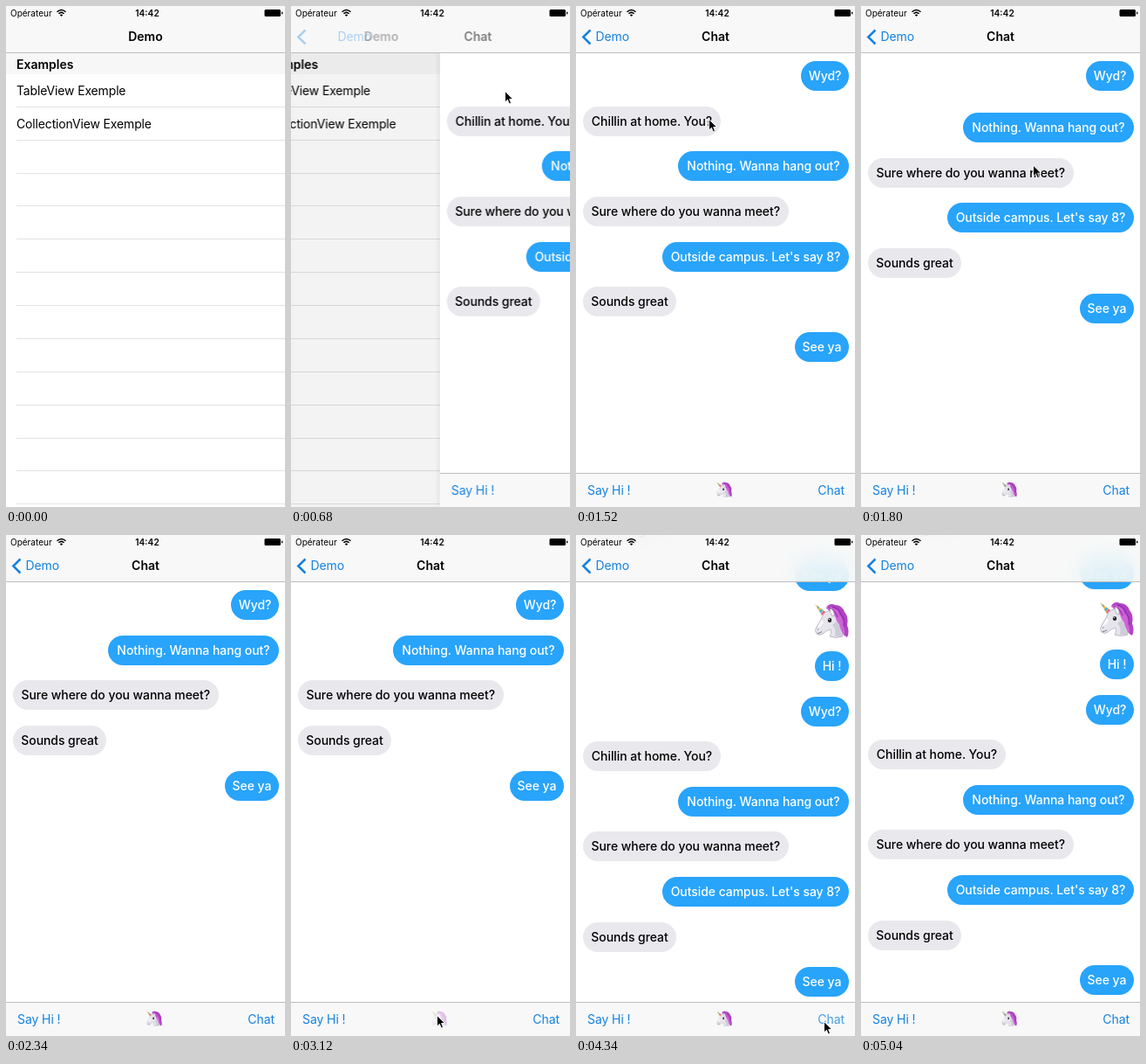
Recreate the animation shown at these times as an HTML page. Size 320 by 573 pixels, loop 5060 ms.

```html
<!DOCTYPE html>
<html lang="en">
<head>
<meta charset="utf-8">
<title>Chat demo</title>
<style>
:root { --tint: #1482e0; --row: 51.65px; --push: cubic-bezier(.36, .66, .04, 1); }
html, body { margin: 0; width: 100%; height: 100%; overflow: hidden; background: #fff; }
body { position: relative; font: 14px/20px Inter, Roboto, sans-serif; letter-spacing: -.08px; color: #000; }
#stage { position: absolute; left: 0; top: 0; width: 320px; height: 573px; overflow: hidden; }
#stage * { position: absolute; box-sizing: border-box; white-space: nowrap; }
b { font-weight: 600; letter-spacing: 0; }

/* every moving part shares one clock */
.anim, .anim::after { animation: 5060ms linear infinite; }

#list { inset: 0; background: #fff; animation-name: list-slide; }
#list::after { content: ""; position: absolute; inset: 0; background: #000; opacity: 0; animation-name: dim; }
#list .head { top: 54px; width: 320px; height: 24px; padding: 3px 12px; background: #f7f7f7; font-weight: 600; letter-spacing: 0; }
#list .cell { left: 12px; right: 0; height: 37.87px; padding-top: 9px; border-bottom: 1px solid #e2e1e4; letter-spacing: -.15px; }

#page { inset: 0; background: #fff; box-shadow: -2px 0 5px rgba(0, 0, 0, .08); animation-name: page-slide; }
#clip { inset: 0; overflow: hidden; }
#rows { left: 0; top: 54.2px; width: 320px; animation-name: scroll; }
#rows .row { position: relative; height: var(--row); overflow: hidden; }
.bubble { bottom: 8.8px; height: 34px; border-radius: 17px; line-height: 34px; text-align: center; font-weight: 500; letter-spacing: -.06px; }
.in { left: 8px; background: #e9e8ed; }
.out { right: 7px; background: #28a4fb; color: #fff; }
.big { right: 7px; bottom: 5.8px; width: 40px; height: 40px; }
.gone1 { animation-name: gone1; }
.gone2 { animation-name: gone2; }
.unicorn { animation-name: add-unicorn; }
.hi { animation-name: add-hi; }
.chat { animation-name: add-chat; }

.bar { left: 0; width: 320px; background: rgba(248, 248, 248, .88); backdrop-filter: saturate(1.8) blur(14px); }
#tools { top: 534px; height: 39px; border-top: 1px solid #bcbcbf; color: var(--tint); }
#tools * { top: 9px; }
#say { left: 13px; animation-name: tap-say; }
#uni { left: 161px; width: 18px; height: 18px; animation-name: tap-uni; }
#add { right: 12px; animation-name: tap-add; }

#nav { top: 0; height: 54px; border-bottom: 1px solid #bcbcbf; }
#nav .title { top: 25px; width: 320px; text-align: center; }
#demo { animation-name: demo-slide, demo-fade; }
#chat { animation-name: chat-slide, chat-fade; }
#back { left: 22.5px; top: 25px; color: var(--tint); animation-name: back-slide, back-fade; }
#chevron { left: 0; top: 0; animation-name: back-fade; }
#status { left: 0; top: 0; width: 320px; height: 16px; font-size: 10px; line-height: 16px; letter-spacing: 0; }
#status b { left: 2px; width: 320px; text-align: center; font-size: 10.2px; }
#cursor { left: 0; top: 0; overflow: visible; animation-name: cursor; }

/* push transition */
@keyframes page-slide { 0%, 10.87% { transform: translateX(330px); animation-timing-function: var(--push); } 19.96%, 100% { transform: none; } }
@keyframes list-slide { 0%, 10.87% { transform: none; animation-timing-function: var(--push); } 19.96%, 100% { transform: translateX(-96px); } }
@keyframes dim { 0%, 10.87% { opacity: 0; animation-timing-function: var(--push); } 19.96%, 100% { opacity: .1; } }
@keyframes demo-slide { 0%, 10.87% { transform: none; animation-timing-function: var(--push); } 19.96%, 100% { transform: translateX(-117px); } }
@keyframes demo-fade { 0%, 10.87% { opacity: 1; } 14.5%, 100% { opacity: 0; } }
@keyframes chat-slide { 0%, 10.87% { transform: translateX(105px); animation-timing-function: var(--push); } 19.96%, 100% { transform: none; } }
@keyframes chat-fade { 0%, 10.87% { opacity: 0; } 16%, 100% { opacity: 1; } }
@keyframes back-slide { 0%, 10.87% { transform: translateX(60px); animation-timing-function: var(--push); } 19.96%, 100% { transform: none; } }
@keyframes back-fade { 0%, 10.87% { opacity: 0; } 18.6%, 100% { opacity: 1; } }

/* rows closing and opening */
@keyframes gone1 { 0%, 31.23% { height: var(--row); animation-timing-function: ease-in-out; } 37.15%, 100% { height: 0; } }
@keyframes gone2 { 0%, 39.53% { height: var(--row); animation-timing-function: ease-in-out; } 45.45%, 100% { height: 0; } }
@keyframes add-unicorn { 0%, 61.26% { height: 0; animation-timing-function: ease-in-out; } 67.19%, 100% { height: var(--row); } }
@keyframes add-hi { 0%, 70.67% { height: 0; animation-timing-function: ease-in-out; } 76.6%, 100% { height: var(--row); } }
@keyframes add-chat { 0%, 79.45% { height: 0; animation-timing-function: ease-in-out; } 85.38%, 100% { height: var(--row); } }
@keyframes scroll { 0%, 80.24% { transform: none; animation-timing-function: ease-in-out; } 86.17%, 100% { transform: translateY(-242px); } }

/* button feedback */
@keyframes tap-uni { 0%, 60.9% { opacity: 1; } 61.2%, 64% { opacity: .3; } 69%, 100% { opacity: 1; } }
@keyframes tap-say { 0%, 70% { opacity: 1; } 70.4%, 71.5% { opacity: .3; } 76.5%, 100% { opacity: 1; } }
@keyframes tap-add { 0%, 79.2% { opacity: 1; } 79.5%, 82% { opacity: .3; } 87.5%, 100% { opacity: 1; } }

@keyframes cursor {
  0%, 2.96% { transform: translate(322px, 118px); animation-timing-function: ease-out; }
  8.3%, 19.76% { transform: translate(245px, 97px); animation-timing-function: ease-in-out; }
  29.25%, 32.4% { transform: translate(152px, 129px); animation-timing-function: ease-in-out; }
  38.7%, 40.3% { transform: translate(240px, 232px); animation-timing-function: ease-in; }
  45.06% { transform: translate(322px, 250px); }
  45.07%, 55.3% { transform: translate(176px, 575px); animation-timing-function: ease-out; }
  59.3%, 62.5% { transform: translate(167px, 549px); animation-timing-function: ease-in-out; }
  67.6%, 70.75% { transform: translate(40px, 550px); animation-timing-function: ease-in; }
  74.7% { transform: translate(112px, 540px); animation-timing-function: ease-out; }
  79.05%, 87.35% { transform: translate(284px, 556px); animation-timing-function: ease-in; }
  91.9%, 100% { transform: translate(322px, 575px); }
}
</style>
</head>
<body>
<div id="stage">
  <svg width="0" height="0">
    <symbol id="horse" viewBox="0 0 40 40">
      <path d="M14 5Q18-1 24 2Q32 2 35 10Q40 16 38 25Q41 33 38 39Q32 36 31 30L20 12Z" fill="#b044c4"/>
      <path d="M11 12Q18 6 24 11Q32 18 33 38Q25 41 18 38Q21 34 19 30Q14 31 10 35Q6 38 3 35Q0 32 3 27Q8 20 11 12Z" fill="#e6e4ec" stroke="#b3adbd" stroke-width=".8"/>
      <path d="M9 19Q5 25 4 29Q8 27 11 22Z" fill="#fbfafc"/>
      <path d="M21 25Q26 30 24 38H32Q32 28 27 20Z" fill="#cfccd9"/>
      <path d="M14 6Q18 2 22 6Q28 7 29 13Q34 18 33 25Q36 31 35 37Q30 31 29 24Q25 20 24 15Q20 9 14 6Z" fill="#cf62d8"/>
      <path d="M21 4Q29 6 31 13Q36 19 35 27M17 5Q25 9 27 16" fill="none" stroke="#8d2fa8" stroke-width="1.1"/>
      <path d="M20 14Q17 9 19 6Q24 9 23 15Z" fill="#f3f1f6" stroke="#a9a2b4" stroke-width=".7"/>
      <path d="M1 1L13 10L9 14Z" fill="#f0b84c"/>
      <path d="M3.5 3L6 4.700L4.500 6.500ZM8.500 6.700L10.500 8.200L7.500 11.500L6 9Z" fill="#4bb3d8"/>
      <path d="M11 8.600L13 10L9 14L8.400 12.500Z" fill="#e2609f"/>
      <ellipse cx="18" cy="19.500" rx="2.200" ry="2.600" fill="#2a222e"/>
      <circle cx="17.400" cy="18.600" r=".7" fill="#fff"/>
      <path d="M4 30.500l1.300-1M4 34.500q3 0 5-2" fill="none" stroke="#77707f" stroke-width="1"/>
    </symbol>
  </svg>

  <div id="list" class="anim"><div class="head">Examples</div></div>

  <div id="page" class="anim">
    <div id="clip"><div id="rows" class="anim"></div></div>
    <div id="tools" class="bar">
      <span id="say" class="anim">Say Hi !</span>
      <svg id="uni" class="anim"><use href="#horse"/></svg>
      <span id="add" class="anim">Chat</span>
    </div>
  </div>

  <div id="nav" class="bar">
    <b id="demo" class="title anim">Demo</b>
    <b id="chat" class="title anim">Chat</b>
    <svg id="chevron" class="anim" width="22" height="54"><path d="M16.500 27.500L8.300 35.500l8.200 8" fill="none" stroke="#1482e0" stroke-width="2.500"/></svg>
    <span id="back" class="anim">Demo</span>
    <div id="status">
      <span style="left:5px">Opérateur</span>
      <b>14:42</b>
      <svg width="320" height="16" style="left:0;top:0">
        <g fill="none" stroke="#000" stroke-width="1.500">
          <path d="M58.500 6.800Q63.500 2.200 68.500 6.800M60.400 8.700Q63.500 6 66.600 8.700"/>
        </g>
        <path d="M61.700 10.200Q63.500 8.800 65.300 10.200L63.500 12Z"/>
        <rect x="296.500" y="4" width="18.500" height="8" rx="1.500"/>
        <path d="M316 6.500q1.500 .3 1.500 1.500t-1.500 1.500Z"/>
      </svg>
    </div>
  </div>

  <svg id="cursor" class="anim" width="12" height="18">
    <path d="M.5 .5V13L3.400 10.300L5.300 14.800L7.500 13.900L5.600 9.500H9.500Z" fill="#000" stroke="#fff" stroke-width=".9"/>
  </svg>
</div>

<script>
const list = document.getElementById("list");
const rows = document.getElementById("rows");

function add(parent, className, text = "") {
  const el = document.createElement("div");
  el.className = className;
  el.textContent = text;
  return parent.appendChild(el);
}

for (let i = 0; i < 13; i++) {
  const text = ["TableView Exemple", "CollectionView Exemple"][i];
  add(list, "cell", text).style.top = 78 + i * 37.87 + "px";
}

// text, side, bubble width, animation of the first copy
const talk = [
  ["Wyd?", "out", 55],
  ["Chillin at home. You?", "in", 158, "gone1"],
  ["Nothing. Wanna hang out?", "out", 196],
  ["Sure where do you wanna meet?", "in", 235.5],
  ["Outside campus. Let's say 8?", "out", 214, "gone2"],
  ["Sounds great", "in", 107],
  ["See ya", "out", 62]
];

function addRow(text, side, width, motion) {
  const row = add(rows, "row" + (motion ? " anim " + motion : ""));
  add(row, "bubble " + side, text).style.width = width + "px";
}

talk.forEach(line => addRow(...line));
add(rows, "row anim unicorn").innerHTML = '<svg class="big"><use href="#horse"/></svg>';
addRow("Hi !", "out", 39, "hi");
talk.forEach(([text, side, width]) => addRow(text, side, width, "chat"));
</script>
</body>
</html>
```
